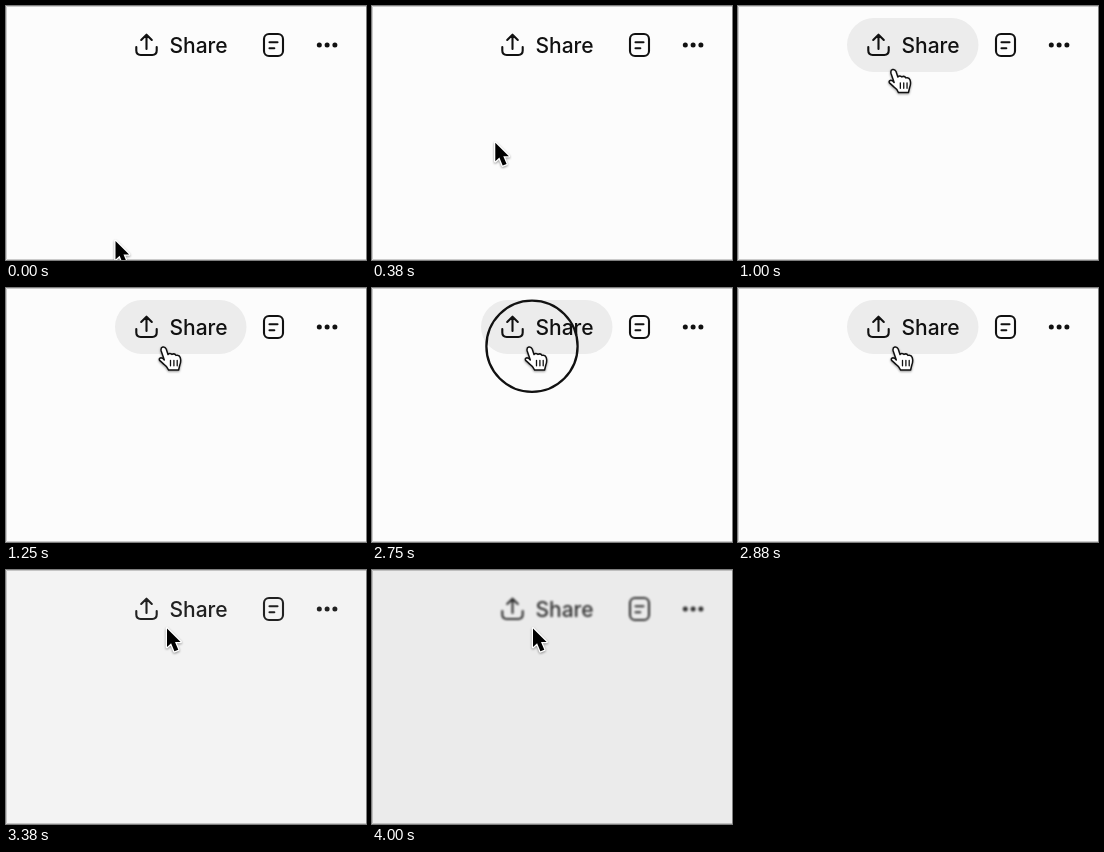
Recreate the animation shown at these times as an HTML page. Size 360 by 254 pixels, loop 4120 ms.

```html
<!DOCTYPE html>
<html lang="en">
<head>
<meta charset="utf-8">
<title>Share button</title>
<style>
  html, body { margin: 0; width: 100%; height: 100%; overflow: hidden; background: #fcfcfc; }
  svg { display: block; width: 360px; height: 254px; }
  text { font: 500 21px Inter, "Liberation Sans", sans-serif; fill: #111; }
  .line { fill: none; stroke: #111; stroke-width: 2.1; stroke-linecap: round; stroke-linejoin: round; }
  .cursor { filter: drop-shadow(0 1px 1.2px rgba(0, 0, 0, .4)); }
</style>
</head>
<body>
<svg viewBox="0 0 360 254">
  <rect width="360" height="254" fill="#fcfcfc"/>
  <rect id="pill" x="109" y="12" width="131.5" height="54" rx="27" fill="#ececec"/>
  <g id="toolbar">
    <path class="line" d="M130.3 41v3.6q0 4.4 4.4 4.4h11.6q4.4 0 4.4-4.4V41M140.5 43V29M135.2 34l5.3-5.3 5.3 5.3"/>
    <text x="163.5" y="46.5">Share</text>
    <rect class="line" x="258" y="28" width="19" height="22" rx="5"/>
    <path class="line" d="M263.5 36.2h8M263.5 42.2h4.8"/>
    <g fill="#111">
      <circle cx="313.3" cy="39" r="2.5"/>
      <circle cx="321.1" cy="39" r="2.5"/>
      <circle cx="328.9" cy="39" r="2.5"/>
    </g>
  </g>
  <path d="M360 .5H.5V253.5H360" fill="none" stroke="#cbcbcb"/>
  <rect id="shade" width="360" height="254"/>
  <circle id="ring" cx="160" cy="58.3" r="45.6" fill="none" stroke="#111" stroke-width="2.3"/>
  <g id="arrow">
    <path class="cursor" d="M0 0V18.6L4.1 14.8 7.4 22.8 11.3 21.2 8 13.4H13.6Z" stroke="#fff" stroke-width="2.6" paint-order="stroke" stroke-linejoin="round"/>
  </g>
  <g id="hand">
    <g class="cursor" transform="translate(-161 -58.5)" stroke="#111" stroke-width="1.5" stroke-linecap="round" stroke-linejoin="round">
      <path fill="#fff" d="M158.3 72L155.2 63Q154.4 59.6 156.8 59 159.2 58.6 160.2 61L162 66.5Q163.6 64.6 166 66.4 168.6 65 170 67.4 173.2 66.4 174.2 69.5 175.4 73 173.8 77L172.6 82H162.6Q161.4 78.6 158 76.4 155.4 74 153.6 72.4 152.6 70.2 155 69.8 156.8 70 158.3 72Z"/>
      <path fill="none" stroke-width="1.3" d="M164.5 72.3v5.5M167.9 72.3v5.5M171.2 72.3v5.5"/>
    </g>
  </g>
</svg>
<script>
const LOOP = 4120, STEP = 125;
const START = { x: 109.5, y: 235 }, END = { x: 161, y: 58.5 };
const el = id => document.getElementById(id);
const [pill, toolbar, shade, ring, arrow, hand] =
  ["pill", "toolbar", "shade", "ring", "arrow", "hand"].map(el);
const between = (v, from, to) => v >= from && v < to;
const show = (node, on) => node.setAttribute("visibility", on ? "visible" : "hidden");

function pointerAt(step) {
  const t = Math.min(step / 10, 1);
  const leftX = Math.pow((1 + Math.cos(Math.PI * t)) / 2, 1.35);
  const leftY = Math.pow(1 - t, 2.28);
  return {
    x: END.x + (START.x - END.x) * leftX,
    y: END.y + (START.y - END.y) * leftY
  };
}

function render(ms) {
  const step = Math.floor(ms / STEP);
  const hover = between(step, 8, 26);
  const dim = Math.max(0, Math.min((step - 26) / 2, 1));
  const { x, y } = pointerAt(step);

  for (const cursor of [arrow, hand]) {
    cursor.setAttribute("transform", `translate(${x.toFixed(2)} ${y.toFixed(2)})`);
  }
  show(pill, hover);
  show(hand, hover);
  show(arrow, !hover && !between(step, 28, 32));
  show(ring, step === 22);
  shade.setAttribute("opacity", 0.068 * dim);
  toolbar.style.filter = dim ? `blur(${1.3 * dim}px)` : "none";
  toolbar.setAttribute("opacity", 1 - 0.15 * dim);
}

const origin = performance.now();
function tick() {
  render((performance.now() - origin) % LOOP);
  requestAnimationFrame(tick);
}
render(0);
requestAnimationFrame(tick);
</script>
</body>
</html>
```
